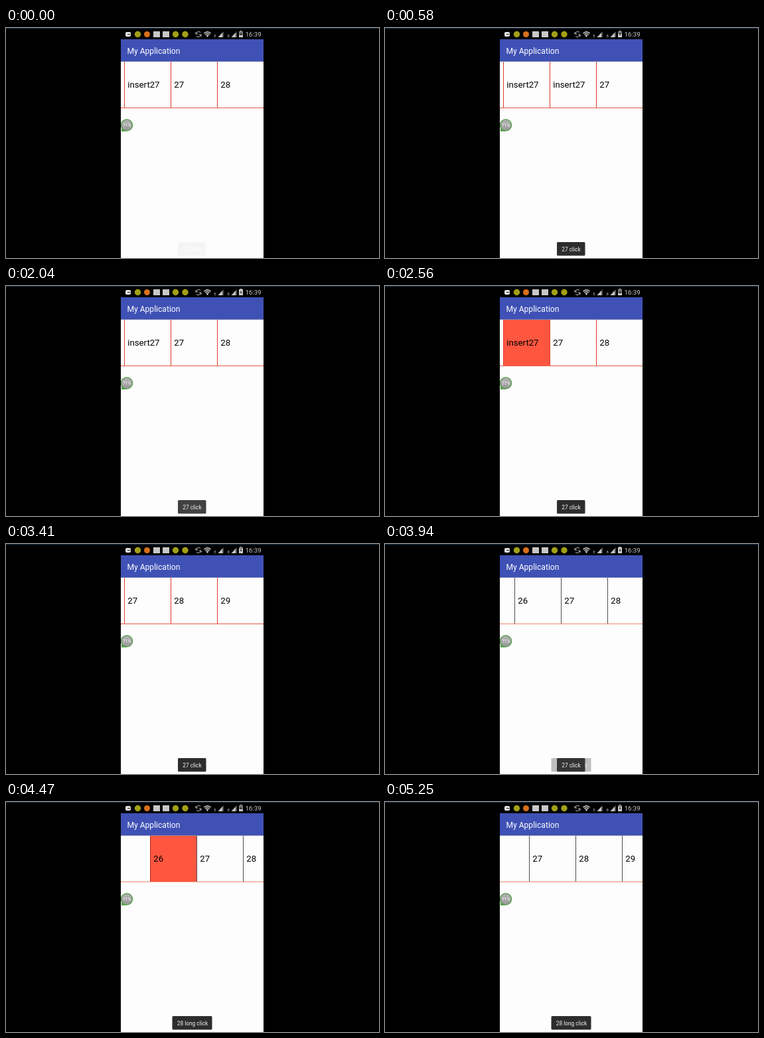
Animation, 562 px wide and 347 px high, one loop 5.61 s. Source, as an HTML page:

```html
<!DOCTYPE html>
<html>
<head>
<meta charset="utf-8">
<style>
  html, body { margin: 0; width: 100%; height: 100%; overflow: hidden; background: #000; }
  svg { display: block; font-family: Roboto, sans-serif; }
  rect { shape-rendering: crispEdges; }
  .soft { shape-rendering: auto; }
</style>
</head>
<body>
<svg width="562" height="347" viewBox="0 0 562 347">
  <defs>
    <clipPath id="screen"><rect x="173" y="0" width="215" height="347"/></clipPath>
    <linearGradient id="ball" x2="0" y2="1">
      <stop stop-color="#b4b4b4"/><stop offset="1" stop-color="#989898"/>
    </linearGradient>
  </defs>
  <rect width="562" height="347"/>
  <rect width="562" height="1" fill="#142c48"/>

  <g clip-path="url(#screen)">
    <rect x="173" y="17" width="215" height="330" fill="#fdfdfd"/>
    <g id="list"></g>
    <rect id="base" x="173" y="120" width="215" height="1"/>
    <rect x="173" y="17" width="215" height="34" fill="#3f51b5"/>
    <rect x="173" y="50" width="215" height="1" fill="#7d85b4"/>
    <text x="182.4" y="38.5" font-size="12.1" fill="#fff">My Application</text>

    <path d="M174 149V156H182Z" fill="#5ba052"/>
    <circle cx="182" cy="146.5" r="8.6" fill="url(#ball)" stroke="#5ba052" stroke-width="1.5"/>
    <text x="182" y="149" font-size="6.5" fill="#fff" text-anchor="middle">71%</text>
  </g>

  <!-- status bar -->
  <rect class="soft" x="180" y="6" width="8" height="7" rx="2" fill="#e4e4e4"/>
  <rect x="183" y="9" width="4" height="1" fill="#222"/>
  <g fill="#a2a016">
    <circle cx="198.500" cy="9.500" r="4.700"/>
    <circle cx="255.500" cy="9.500" r="4.700"/>
    <circle cx="270" cy="9.500" r="4.700"/>
  </g>
  <circle cx="212.500" cy="9.500" r="4.500" fill="#d8701c"/>
  <rect x="222" y="5" width="10" height="9" fill="#c8c8c8"/>
  <rect x="236" y="5" width="10" height="9" fill="#c8c8c8"/>
  <g fill="none" stroke="#c4c4c4">
    <path d="M286.500 8.500A4 4 0 0 1 293 6.500M293.500 10.500A4 4 0 0 1 287 12.500M286 6v3h3M294 13v-3h-3"/>
    <path d="M298.500 8.200Q303.500 3.600 308.500 8.200M300.300 10.200Q303.500 7 306.700 10.200" stroke-width="1.600"/>
  </g>
  <path d="M301.500 11.300Q303.500 9.700 305.500 11.300L303.500 14Z" fill="#d0d0d0"/>
  <g fill="#c0c0c0" font-size="6">
    <text x="313.500" y="14">E</text>
    <text x="333.500" y="14">8</text>
  </g>
  <path d="M319.500 14L328 5V14ZM339.500 14L348 5V14Z" fill="#555"/>
  <path d="M319.500 14L326 7.100V14ZM339.500 14L346 7.100V14Z" fill="#c4c4c4"/>
  <rect x="353" y="4" width="2" height="1" fill="#ccc"/>
  <rect x="351" y="5" width="6" height="9" fill="#777"/>
  <rect id="charge" x="351" width="6" fill="#ccc"/>
  <path d="M354.700 6.500L352.500 10H354L353.300 12.500L355.600 9H354.100Z" fill="#111"/>
  <text x="360.700" y="13" font-size="9.600" fill="#ccc">16:39</text>

  <g id="long">
    <rect class="soft" x="250.500" y="323" width="60" height="20.500" rx="1.500" fill="#2d2d2d"/>
    <text x="257.700" y="336.600" font-size="8.360" fill="#f4f4f4">28 long click</text>
  </g>
  <g id="short">
    <rect class="soft" x="259" y="323" width="42.500" height="20.500" rx="1.500" fill="#2d2d2d"/>
    <text x="266.200" y="336.600" font-size="8.360" fill="#f4f4f4">27 click</text>
  </g>
</svg>
<script>
const LOOP = 5610, CELL = 70, SCROLL_AT = 3710;
const $ = id => document.getElementById(id);

function add(parent, tag, attrs) {
  const el = document.createElementNS('http://www.w3.org/2000/svg', tag);
  set(el, attrs);
  return parent.appendChild(el);
}
function set(el, attrs) {
  for (const k in attrs) el.setAttribute(k, attrs[k]);
}
// value of the latest [time, value] step
const at = (steps, t) => steps.filter(s => s[0] <= t).pop()[1];

const labels = [
  [0, '25 26 insert27 27 28'],
  [320, '25 26 insert27 insert27 27'],
  [1980, '25 26 insert27 27 28'],
  [2980, '25 26 27 28 29'],
  [4520, '25 27 28 29 30']
];
const pressed = [
  [0, -1], [1500, 3], [1980, -1], [2330, 2], [2980, -1],
  [3460, 2], [3710, -1], [4290, 1], [4520, -1]
];
const shortToast = [
  [0, .03], [60, .15], [120, .35], [180, .6], [240, .8], [300, 1],
  [2040, .9], [2160, 0], [2330, .3], [2400, .6], [2480, .85], [2560, 1],
  [3940, .95], [3997, .5], [4055, .2], [4112, 0]
];
const longToast = [[0, 0], [3882, .1], [3940, .3], [3997, .55], [4055, .8], [4112, 1]];
const charges = [60, 1010, 1980, 2400, 2800, 3410, 3850, 4290, 4830, 5250];

const cells = Array.from({ length: 5 }, () => ({
  fill: add($('list'), 'rect', { y: 51, width: CELL, height: 69, fill: '#ff5640' }),
  line: add($('list'), 'rect', { y: 51, width: 1, height: 69 }),
  text: add($('list'), 'text', { y: 90.3, 'font-size': 13.2 })
}));

// the drag slows down over nine steps
function scroll(t) {
  if (t < SCROLL_AT) return 0;
  const step = Math.min(9, Math.floor((t - SCROLL_AT) / 57.5) + 1);
  return Math.floor(109 * (1 - (1 - step / 9) ** 2));
}

function draw(t) {
  const names = at(labels, t).split(' '), down = at(pressed, t);
  const left = 38 + scroll(t), moved = t >= SCROLL_AT;
  cells.forEach((c, i) => {
    const x = left + i * CELL;
    set(c.fill, { x, opacity: i === down ? 1 : 0 });
    set(c.line, { x, fill: !moved ? '#e0392b' : i === down ? '#a83222' : '#505050' });
    set(c.text, { x: x + 5.3 });
    c.text.textContent = names[i];
  });
  set($('base'), { fill: moved ? '#f08a72' : '#e8584a' });
  set($('short'), { opacity: at(shortToast, t) });
  set($('long'), { opacity: at(longToast, t) });
  const h = 3 + charges.filter(c => c <= t).length % 4 * 2;
  set($('charge'), { y: 14 - h, height: h });
}

const start = performance.now();
(function frame() {
  draw((performance.now() - start) % LOOP);
  requestAnimationFrame(frame);
})();
</script>
</body>
</html>
```
